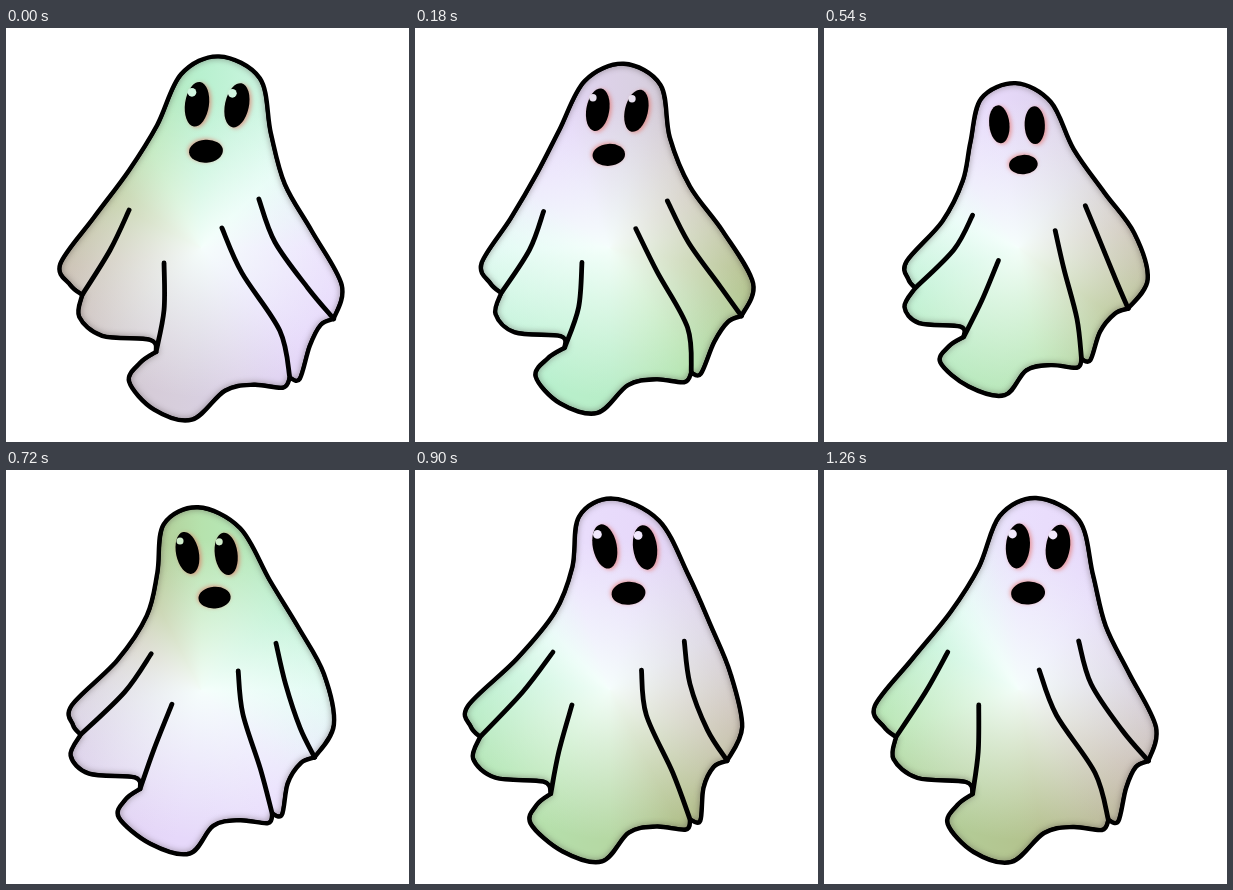
Write an HTML page with a canvas that moves like this. It is 403 px wide and 414 px high and loops after 1350 ms.

```html
<!DOCTYPE html>
<html lang="en">
<head>
<meta charset="utf-8">
<title>Ghost</title>
<style>
  html, body { margin: 0; width: 100%; height: 100%; overflow: hidden; background: #fff; }
  canvas { display: block; width: 403px; height: 414px; }
</style>
</head>
<body>
<canvas id="stage"></canvas>
<script>
const W = 403, H = 414, STEP = 90, COUNT = 15, TAU = 2 * Math.PI;
const canvas = document.getElementById('stage');
const ctx = canvas.getContext('2d');
const dpr = window.devicePixelRatio || 1;
canvas.width = W * dpr;
canvas.height = H * dpr;

// The sheet at rest: corners where folds meet the hem, and the curves between them
const cornerL = [76, 267], cornerR = [328, 291], notchR = [284, 350], notchL = [150, 324];
const outline = [
  [cornerL, [64, 257], [54, 236], [88, 189], [123, 142], [151, 97], [175, 46], [213, 28],
    [254, 50], [265, 105], [279, 156], [306, 203], [336, 257], cornerR],
  [cornerR, [315, 297], [304, 318], [294, 351], notchR],
  [notchR, [277, 360], [248, 357], [219, 363], [186, 392], [148, 382], [123, 354], [134, 335], notchL],
  [notchL, [144, 312], [96, 308], [73, 289], cornerL]
];
const folds = [
  [[123, 182], [104, 222], cornerL],
  [[158, 235], [158, 282], notchL],
  [[216, 200], [236, 245], [274, 303], notchR],
  [[253, 171], [269, 214], [302, 260], cornerR]
];
const eyes = [{ at: [191, 76], tilt: 8 }, { at: [231, 77], tilt: 12 }];
const mouth = [200, 123];

// Tints around the ghost: mint, green, olive, tan, mauve, lavender, lilac, ice
const tints = ['b8f0cf', 'b6e4b0', 'b2bf8a', 'c9beb0', 'd8cfe0', 'e6d8fa', 'ebe0fd', 'e2fbf4']
  .map(h => [0, 2, 4].map(i => parseInt(h.slice(i, i + 2), 16)));

const mix = (a, b, k) => a + (b - a) * k;

// Shrinks once per loop as the ghost drifts away
const sinkAt = u => 1.16 * ((1 + Math.cos(TAU * (u - .34))) / 2) ** 3;

// A ripple runs along the sheet, fading towards the tail
function ripple(y, u) {
  const a = TAU * (y - 181) / 305;
  return 10 * (1 - (y / 420) ** 8) * (Math.cos(a) - Math.cos(a + TAU * u));
}

const mover = u => {
  const sink = sinkAt(u);
  return ([x, y]) => [
    x - .115 * sink * (x - 185) + ripple(y, u),
    y - .137 * sink * (y - 218)
  ];
};

function spline(path, pts, start) {
  if (start) path.moveTo(...pts[0]);
  for (let i = 0; i < pts.length - 1; i++) {
    const p = pts[i], q = pts[i + 1], o = pts[i - 1] || p, r = pts[i + 2] || q;
    path.bezierCurveTo(
      p[0] + (q[0] - o[0]) / 6, p[1] + (q[1] - o[1]) / 6,
      q[0] - (r[0] - p[0]) / 6, q[1] - (r[1] - p[1]) / 6, q[0], q[1]);
  }
}

function tint(phase, lift = 0) {
  const n = tints.length, x = (phase - Math.floor(phase)) * n;
  const i = Math.floor(x) % n, next = tints[(i + 1) % n];
  return `rgb(${tints[i].map((v, j) => Math.round(mix(mix(v, next[j], x % 1), 255, lift)))})`;
}

function paintBody(body, phase) {
  const cx = 195, cy = 220, steps = 40;
  const cone = ctx.createConicGradient(-Math.PI / 2, cx, cy);
  for (let i = 0; i <= steps; i++) {
    const a = i / steps;
    const lag = a > .5 ? .1 * Math.sin(TAU * a) : 0;
    cone.addColorStop(a, tint(phase - a - lag));
  }
  const glow = ctx.createRadialGradient(cx, cy, 0, cx, cy, 150);
  glow.addColorStop(0, 'rgba(246,255,252,.95)');
  glow.addColorStop(.35, 'rgba(246,255,252,.6)');
  glow.addColorStop(1, 'rgba(246,255,252,0)');
  ctx.save();
  ctx.clip(body);
  ctx.fillStyle = cone;
  ctx.fillRect(0, 0, W, H);
  ctx.fillStyle = glow;
  ctx.fillRect(0, 0, W, H);
  ctx.shadowColor = 'rgba(70,60,60,.6)';
  ctx.shadowBlur = 6 * dpr;
  ctx.lineWidth = 4;
  ctx.stroke(body);
  ctx.restore();
}

function oval([x, y], rx, ry, tilt) {
  ctx.beginPath();
  ctx.ellipse(x, y, rx, ry, tilt * Math.PI / 180, 0, TAU);
  ctx.fill();
}

function paintFace(move, u, phase) {
  const sink = sinkAt(u), size = 1 - .15 * sink;
  const shine = 4.4 * Math.sqrt(Math.max(0, 1 - sink));
  ctx.save();
  ctx.shadowColor = 'rgba(225,90,75,.55)';
  ctx.shadowBlur = 4 * dpr;
  ctx.shadowOffsetY = dpr;
  for (const eye of eyes) {
    const [x, y] = move(eye.at), top = eye.at[1];
    const lean = Math.atan((ripple(top + 8, u) - ripple(top - 8, u)) / 16) * 180 / Math.PI;
    const tilt = eye.tilt - lean;
    ctx.fillStyle = '#000';
    ctx.shadowOffsetX = 2 * dpr;
    oval([x, y], 12 * size, 22.5 * size, tilt);
    ctx.save();
    ctx.shadowColor = 'transparent';
    ctx.fillStyle = tint(phase, .35);
    oval([x - 6 + tilt * .12, y - 12], shine, shine, 0);
    ctx.restore();
  }
  ctx.fillStyle = '#000';
  ctx.shadowOffsetX = ctx.shadowOffsetY = -dpr;
  oval(move(mouth), 17 * size, 11.5 * size, -4);
  ctx.restore();
}

function draw(frame) {
  const u = frame / COUNT, phase = u * 4, move = mover(u);
  const body = new Path2D(), lines = new Path2D();
  outline.forEach((part, i) => spline(body, part.map(move), i === 0));
  body.closePath();
  folds.forEach(fold => spline(lines, fold.map(move), true));

  ctx.setTransform(dpr, 0, 0, dpr, 0, 0);
  ctx.fillStyle = '#fff';
  ctx.fillRect(0, 0, W, H);
  paintBody(body, phase);
  ctx.strokeStyle = '#000';
  ctx.lineCap = ctx.lineJoin = 'round';
  ctx.lineWidth = 4.4;
  ctx.stroke(body);
  ctx.lineWidth = 4.8;
  ctx.stroke(lines);
  paintFace(move, u, phase);
}

let shown = -1;
function tick() {
  const frame = Math.floor(performance.now() / STEP) % COUNT;
  if (frame !== shown) draw(shown = frame);
  requestAnimationFrame(tick);
}
tick();
</script>
</body>
</html>
```
